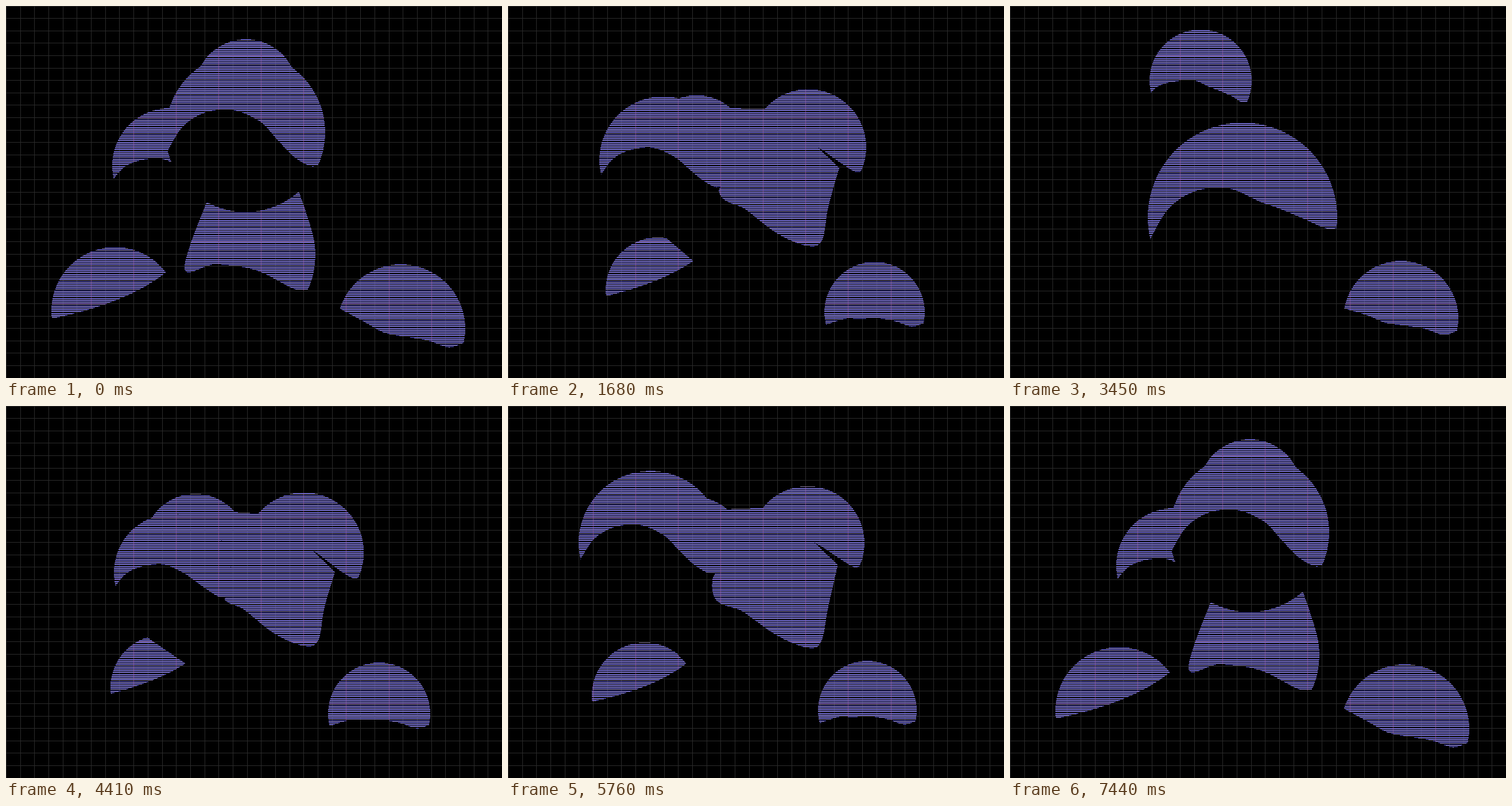
Write an HTML page that moves like this. It is 864x648 px and loops after 7.47 s.

```html
<!DOCTYPE html>
<html lang="en">
<head>
<meta charset="utf-8">
<title>Orbiting blobs</title>
<style>
html, body { margin: 0; width: 100%; height: 100%; overflow: hidden; background: #000; }
svg { display: block; width: 864px; height: 648px; }
</style>
</head>
<body>
<svg viewBox="0 0 864 648" shape-rendering="crispEdges">
  <mask id="lit" maskUnits="userSpaceOnUse" x="0" y="0" width="864" height="648">
    <g id="shapes"></g>
  </mask>
  <rect width="864" height="648" fill="#000"/>
  <path id="grid" fill="#2b2b2b"/>
  <g mask="url(#lit)">
    <path id="cool" fill="#5f5deb"/>
    <path id="warm" fill="#857a9c"/>
    <path id="tint" fill="#c85abe" fill-opacity=".35"/>
  </g>
</svg>
<script>
const WIDTH = 864, HEIGHT = 648;
const LOOP = 7470, STEP = 30, CYCLES = 4;
const COLUMN = WIDTH / 35, ROW = HEIGHT / 30, PITCH = HEIGHT / 200;
const byId = id => document.getElementById(id);
const mod = (a, n) => ((a % n) + n) % n;
const mix = (a, b, s) => a.map((v, j) => v + (b[j] - v) * s);

// Three balls follow one path that takes three cycles: phase, x, y, radius.
const orbit = [
  [0, 418, 148, 90], [.154, 468, 197, 90], [.52, 523, 246, 101], [.783, 405, 368, 165],
  [1, 417, 220, 139], [1.154, 286, 125, 157], [1.48, 248, 238, 125], [1.55, 290, 290, 102],
  [1.783, 350, 370, 95], [2, 285, 278, 100], [2.154, 262, 262, 87], [2.55, 330, 243, 90],
  [2.783, 332, 130, 89]
];

// Phase, x, y, radius, share cut off by the shade.
const leftPath = [
  [0, 190, 531, 111, 0], [.154, 152, 551, 106, 0], [.48, 238, 504, 92, .07],
  [.55, 273, 490, 91, .45], [.783, 270, 500, 88, 1]
];

// Phase, x, y, radius, height of the left tip.
const rightPath = [
  [0, 688, 562, 112, -.31], [.154, 660, 558, 115, -.84], [.48, 626, 530, 86, .26],
  [.55, 650, 536, 89, .24], [.783, 681, 544, 100, -.17]
];

// Torso outline: top left, along the bottom, right shoulder, inner top.
const standing = [362, 310, 311, 455, 365, 450, 435, 460, 508, 495, 531, 482, 537, 410, 500, 295, 430, 290];
const tall = [326, 265, 272, 487, 330, 466, 420, 478, 478, 506, 496, 500, 553, 350, 500, 252, 470, 165];
const leaning = [385, 178, 366, 318, 415, 355, 470, 397, 522, 418, 547, 408, 558, 350, 577, 282, 470, 180];
const tucked = leaning.map(v => 430 + (v - 430) * .25);
const torsoPath = [[0, ...standing], [.154, ...tall], [.52, ...leaning], [.783, ...tucked]];

// Periodic cubic interpolation that does not overshoot its keys.
function sample(keys, period, phase) {
  const n = keys.length, u = mod(phase, period);
  let i = n - 1;
  while (keys[i][0] > u) i--;
  const at = k => keys[mod(k, n)];
  const time = k => at(k)[0] + Math.floor(k / n) * period;
  const span = k => time(k + 1) - time(k);
  const h = span(i), s = (u - time(i)) / h;
  return at(i).slice(1).map((_, j) => {
    const value = k => at(k)[j + 1];
    const slope = k => (value(k + 1) - value(k)) / span(k);
    const tangent = k => {
      const a = slope(k - 1), b = slope(k);
      return a * b <= 0 ? 0 : 2 * a * b / (a + b);
    };
    const a = value(i), b = value(i + 1);
    return a + (b - a) * s * s * (3 - 2 * s)
      + h * s * (1 - s) * ((1 - s) * tangent(i) - s * tangent(i + 1));
  });
}

const dot = p => p[0].toFixed(1) + ' ' + p[1].toFixed(1);
const white = d => `<path fill="#fff" d="${d}Z"/>`;

// Smooth cubic segments through points.
function curve(points) {
  const at = k => points[Math.max(0, Math.min(points.length - 1, k))];
  let d = '';
  for (let i = 0; i < points.length - 1; i++) {
    const [a, b, c, e] = [at(i - 1), at(i), at(i + 1), at(i + 2)];
    const c1 = [0, 1].map(j => b[j] + (c[j] - a[j]) / 6);
    const c2 = [0, 1].map(j => c[j] - (e[j] - b[j]) / 6);
    d += `C${dot(c1)} ${dot(c2)} ${dot(c)}`;
  }
  return d;
}

// Round top between the ends of an edge given in units of the radius.
function dome(x, y, r, edge, straight) {
  const place = p => [x + r * p[0], y + r * p[1]];
  const angle = p => Math.atan2(p[1], p[0]);
  const start = angle(edge[0]);
  let sweep = mod(angle(edge[edge.length - 1]) - start, 2 * Math.PI);
  if (sweep > 6) sweep = 0;
  let d = 'M' + dot(place(edge[0]));
  for (let i = 0; i <= 60; i++) {
    const a = start + sweep * i / 60;
    d += 'L' + dot(place([Math.cos(a), Math.sin(a)]));
  }
  const back = edge.map(place).reverse();
  return white(d + (straight ? 'L' + back.map(dot).join('L') : curve(back)));
}

const onCircle = height => Math.sqrt(1 - height * height);

// Nearer balls show a higher arch, lower ones a shallower lobe.
function ball(u) {
  const [x, y, r] = sample(orbit, 3, u);
  const tip = .23;
  const arch = -.32 * (1 - Math.exp(-Math.max(0, r - 88) / 25));
  const lobe = .42 - Math.max(0, y - 295) / 240;
  const end = onCircle(lobe);
  const edge = [
    [-onCircle(tip), tip], [-.78, tip + (arch - tip) * .6], [-.5, arch + .03], [-.15, arch],
    [.18, arch + .14], [.38, (arch + lobe) / 2], [.6, lobe - .12], [end * .88, lobe], [end, lobe]
  ];
  return `<circle cx="${x}" cy="${y}" r="${r}" fill="#000"/>` + dome(x, y, r, edge);
}

function leftBlob(phase) {
  const [x, y, r, cut] = sample(leftPath, 1, phase);
  const polar = degrees => [Math.cos(degrees * Math.PI / 180), Math.sin(degrees * Math.PI / 180)];
  const tip = polar(173);
  const corner = mix(polar(-37), tip, cut * cut);
  const sag = mix(tip, corner, .6);
  sag[0] += .1 * (1 - cut);
  sag[1] += .2 * (1 - cut);
  const edge = [];
  for (let s = 0; s <= 1.01; s += .125) edge.push(mix(mix(tip, sag, s), mix(sag, corner, s), s));
  edge.push(polar(-42 - 145 * cut));
  return dome(x, y, r, edge, true);
}

function rightBlob(phase) {
  const [x, y, r, tip] = sample(rightPath, 1, phase);
  const lift = tip - .25;
  return dome(x, y, r, [
    [-onCircle(tip), tip], [-.57, .13 + .42 * lift], [-.28, .14 + .15 * lift],
    [.02, .12], [.4, .18], [.74, .29], [.97, .22]
  ]);
}

function torso(phase) {
  const flat = sample(torsoPath, 1, phase), points = [];
  for (let i = 0; i < flat.length; i += 2) points.push([flat[i], flat[i + 1]]);
  const top = points.pop();
  return white('M' + dot(points[0]) + curve(points) + 'L' + dot(top));
}

function draw(ms) {
  const t = Math.floor(mod(ms, LOOP) / STEP) * STEP;
  const p = t / (LOOP - STEP);
  const phase = mod(CYCLES * p * p * (3 - 2 * p), 1);
  const depth = u => {
    const d = Math.abs(u - 1.1);
    return Math.min(d, 3 - d);
  };
  const [far, middle, near] = [phase, phase + 1, phase + 2].sort((a, b) => depth(b) - depth(a));
  byId('shapes').innerHTML = leftBlob(phase) + rightBlob(phase)
    + ball(far) + ball(middle) + torso(phase) + ball(near);
}

function columns(step) {
  let d = '';
  for (let k = 0; k * step < WIDTH; k++) d += `M${Math.round(k * step)} 0h1v${HEIGHT}h-1z`;
  return d;
}
function rows(step, first) {
  let d = '';
  for (let k = 0; k * step + first < HEIGHT; k++) {
    d += `M0 ${Math.floor(k * step + first + 1e-6)}h${WIDTH}v1h-${WIDTH}z`;
  }
  return d;
}
byId('grid').setAttribute('d', columns(COLUMN) + rows(ROW, 0));
byId('cool').setAttribute('d', rows(PITCH, .5));
byId('warm').setAttribute('d', rows(PITCH, 1.5));
byId('tint').setAttribute('d', columns(3 * COLUMN) + rows(5 * ROW, 4 * ROW));

const began = performance.now();
function tick() {
  draw(performance.now() - began);
  requestAnimationFrame(tick);
}
tick();
</script>
</body>
</html>
```
